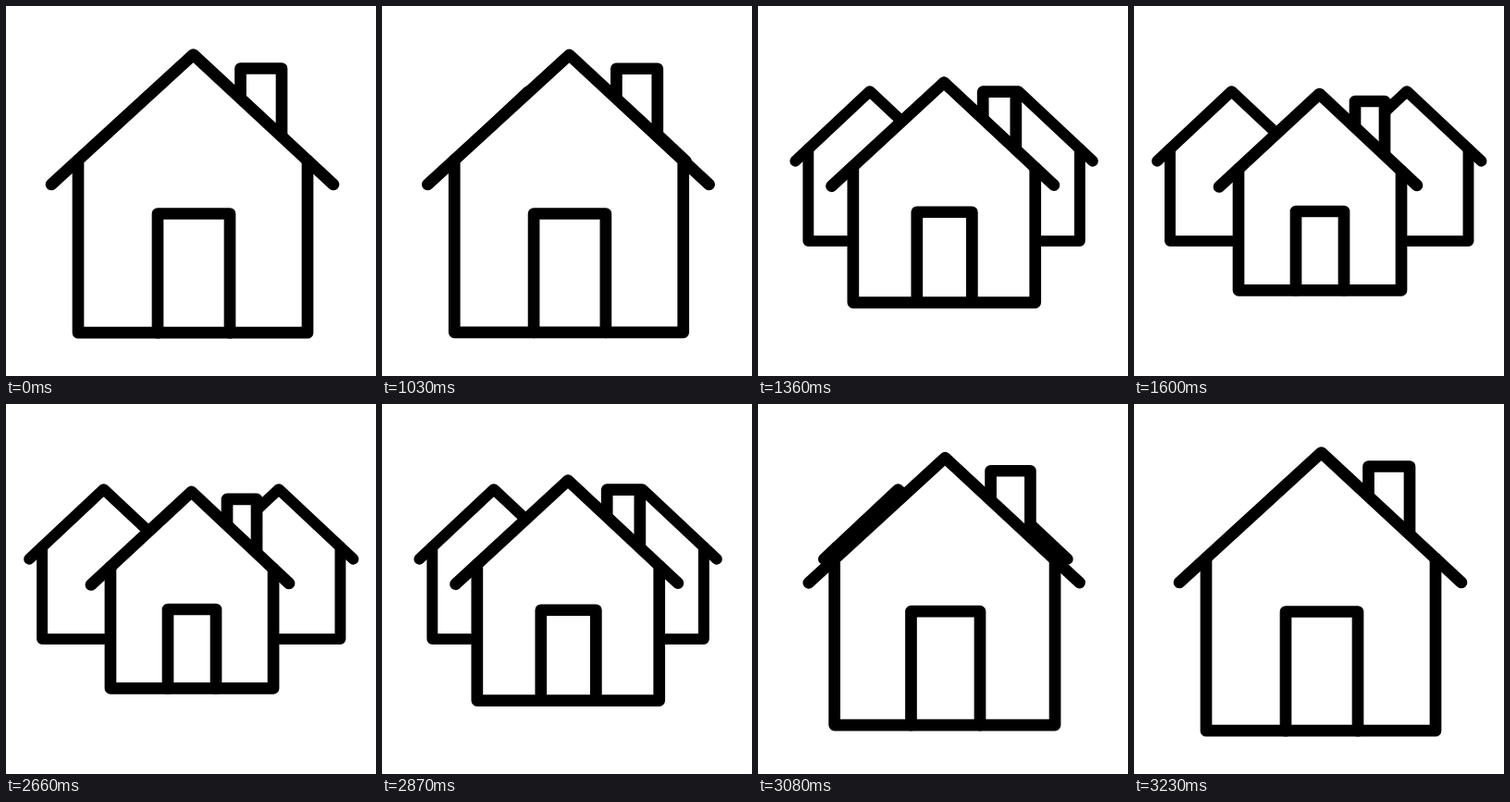
An HTML page with a canvas that plays this animation: 400x400 px, repeating every 3260 ms.

```html
<!DOCTYPE html>
<html lang="en">
<head>
<meta charset="utf-8">
<title>House and neighbours</title>
<style>
html, body { margin: 0; width: 100%; height: 100%; overflow: hidden; background: #fff; }
canvas { display: block; width: 100%; height: 100%; }
</style>
</head>
<body>
<canvas id="stage" width="400" height="400"></canvas>
<script>
const ctx = document.getElementById('stage').getContext('2d');
const LOOP = 3260, STEP = 30, STEPS = 20;
const OPEN_AT = 1000, CLOSE_AT = 2630;
const FRONT_WEIGHT = 12.7, BACK_WEIGHT = 11.9;

const clamp = (v, lo, hi) => Math.min(hi, Math.max(lo, v));

// Symmetric cubic ease, cubic-bezier(a, 0, 1 - a, 1)
function ease(x, a = 0.467) {
  let lo = 0, hi = 1;
  for (let i = 0; i < 24; i++) {
    const s = (lo + hi) / 2, r = 1 - s;
    if (3 * r * r * s * a + 3 * r * s * s * (1 - a) + s ** 3 < x) lo = s;
    else hi = s;
  }
  return lo * lo * (3 - 2 * lo);
}

// 0 = single large house, 1 = three houses; advances in discrete steps
function spread(time) {
  const stepsSince = start => clamp(Math.floor((time - start) / STEP), 0, STEPS);
  const step = stepsSince(OPEN_AT) - stepsSince(CLOSE_AT);
  if (step === 0 || step === STEPS) return step / STEPS;
  return ease(clamp((step + 0.35) / STEPS, 0, 1));
}

function trace(points) {
  ctx.beginPath();
  points.forEach(([x, y]) => ctx.lineTo(x, y));
}

function line(...points) {
  trace(points);
  ctx.stroke();
}

function fill(...points) {
  trace(points);
  ctx.fill();
}

// Height of the line a-b at x
const heightAt = (x, a, b) => a[1] + (x - a[0]) * (b[1] - a[1]) / (b[0] - a[0]);

function house(leftEave, apex, rightEave, leftWall, rightWall, floor) {
  const body = [
    [leftWall, heightAt(leftWall, leftEave, apex)],
    [leftWall, floor],
    [rightWall, floor],
    [rightWall, heightAt(rightWall, rightEave, apex)]
  ];
  fill(...body, apex);
  line(...body);
  line(leftEave, apex, rightEave);
}

function backHouse(x) {
  house([x - 80.5, 167.7], [x, 92.2], [x + 80.5, 167.7], x - 66.5, x + 66.5, 254.1);
}

function draw(p) {
  const mix = (from, to) => from + (to - from) * p;
  ctx.fillStyle = '#fff';
  ctx.fillRect(0, 0, 400, 400);
  ctx.strokeStyle = '#000';
  ctx.lineCap = ctx.lineJoin = 'round';

  if (p > 0) {
    ctx.lineWidth = BACK_WEIGHT;
    backHouse(mix(158.5, 105.5));
    backHouse(mix(248, 295));
  }

  ctx.lineWidth = FRONT_WEIGHT;
  const apex = [mix(202.5, 200.5), mix(52.5, 95)];
  const leftEave = [mix(49, 92), mix(193, 195.5)];
  const rightEave = [mix(354, 306), mix(193, 194)];

  const chimneyLeft = mix(253.5, 239), chimneyRight = mix(298, 271), chimneyTop = mix(67.5, 103);
  const chimney = [
    [chimneyLeft, heightAt(chimneyLeft, apex, rightEave)],
    [chimneyLeft, chimneyTop],
    [chimneyRight, chimneyTop],
    [chimneyRight, heightAt(chimneyRight, apex, rightEave)]
  ];
  fill(...chimney);
  line(...chimney);

  const floor = mix(353.2, 307.3);
  house(leftEave, apex, rightEave, mix(78, 113), mix(326, 289), floor);

  const doorLeft = mix(164, 175), doorRight = mix(242, 227), doorTop = mix(224.5, 222);
  line([doorLeft, floor], [doorLeft, doorTop], [doorRight, doorTop], [doorRight, floor]);
}

const start = performance.now();
function tick() {
  draw(spread((performance.now() - start) % LOOP));
  requestAnimationFrame(tick);
}
tick();
</script>
</body>
</html>
```
